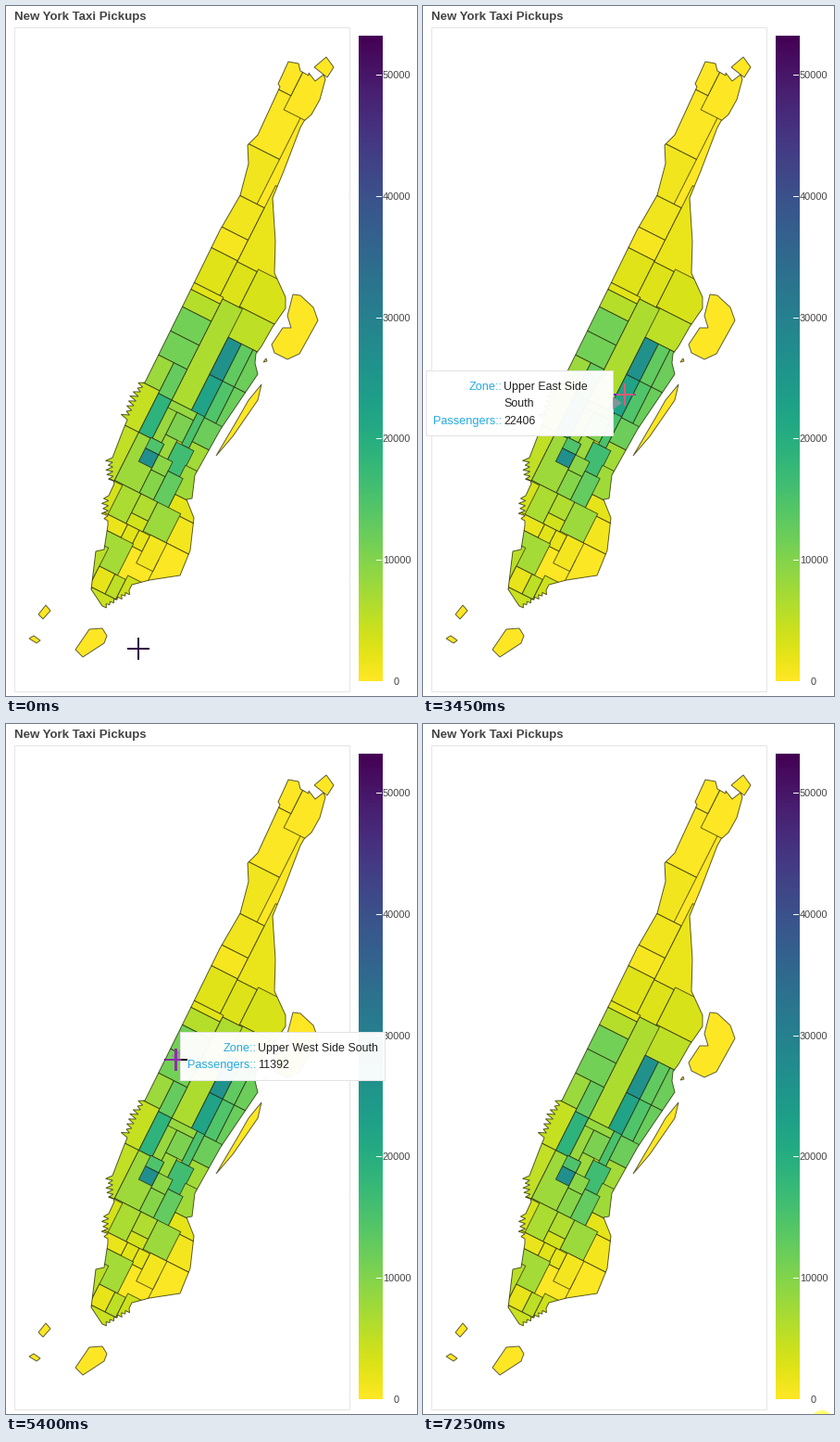
A matplotlib script that plays this animation: 444x744 px, repeating every 7.34 s.

```python
import numpy as np
import matplotlib.pyplot as plt
from matplotlib.animation import FuncAnimation
from matplotlib.collections import PolyCollection
from matplotlib.patches import Circle, Polygon, Rectangle
from matplotlib.path import Path
from matplotlib.textpath import TextPath

W, H = 444, 744
LOOP, STEP = 7340, 20
TOP = 53150
FONT = "Liberation Sans"
TIP_PX = 12.4
EDGE = (0.1, 0.1, 0.05, 0.68)
INK = (0.2, 0.02, 0.27)
CMAP = plt.get_cmap("viridis_r")
rng = np.random.default_rng(4)

fig = plt.figure(figsize=(W / 100, H / 100), dpi=100, facecolor="white")
ax = fig.add_axes([0, 0, 1, 1])
ax.set_xlim(0, W)
ax.set_ylim(H, 0)
ax.axis("off")


def label(x, y, s, px, **kw):
    kw.setdefault("color", "#444444")
    return ax.text(x, y, s, fontsize=px * 0.72, family=FONT, **kw)


def text_width(s):
    path = TextPath((0, 0), s, size=TIP_PX, prop={"family": FONT})
    return path.get_extents().width + 1


def piers(x0, y0, x1, y1, n, depth):
    """Ragged waterfront: n teeth pointing to the outer side of a line."""
    p, q = np.array([x0, y0]), np.array([x1, y1])
    out = np.array([y1 - y0, x0 - x1]) / np.hypot(x1 - x0, y1 - y0)
    pts = []
    for f in np.arange(n) / n:
        foot = p + (q - p) * f
        tip_at = foot + (q - p) * 0.4 / n
        pts += [foot, tip_at + out * depth * rng.uniform(0.5, 1.1)]
    return pts + [q]


# ---- shoreline, clockwise from the north-west corner
SHORE = np.array([
    (296, 87), (294, 84), (300, 71), (305, 60), (316, 62), (318, 70), (327, 75),
    (327, 72), (334, 81), (343, 74), (345, 79), (339, 101), (330, 117),
    (322, 124), (318, 131), (300, 178), (288, 207), (291, 254), (290, 288),
    (302, 314), (302, 326), (288, 346), (276, 367), (270, 375), (269, 385),
    (272, 397), (232, 456), (204, 506), (201, 531), (195, 532), (203, 552),
    (199, 587), (188, 614), (155, 619), (136, 624),
    *piers(133, 630, 104, 647, 7, 4), (92, 629), (97, 588), (106, 586),
    (110, 560), *piers(110, 555, 111, 528, 5, 7), (117, 515),
    *piers(116, 512, 115, 487, 5, 7), (125, 461),
    *piers(131, 446, 150, 406, 8, 8), (203, 299), (231, 242), (253, 204),
    (262, 170), (261, 150), (272, 139)])
shore = Path(SHORE)

# ---- zones lie on the street grid: a runs across town, s runs downtown
ORIGIN = np.array([234, 316])
ACROSS, DOWN = np.array([0.893, 0.451]), np.array([-0.451, 0.893])
zones = []


def column(a0, a1, s, *blocks):
    """Stack blocks of (end, passengers, name) between two avenues."""
    for end, value, name in blocks:
        corners = [(a0, s), (a1, s), (a1, end), (a0, end)]
        pts = np.array([ORIGIN + a * ACROSS + b * DOWN for a, b in corners])
        zones.append((value, name, pts, Path(pts), CMAP(value / TOP)))
        s = end


# uptown
column(-16, 20, -222, (-108, 40, "Highbridge Park"))
column(-70, -13, -229, (-162, 400, "Washington Heights North"),
       (-108, 1107, "Washington Heights South"))
column(-33, 40, -300, (-212, 150, "Inwood"))
column(-70, -33, -300, (-229, 90, "Inwood Hill Park"))
column(-50, -4, -108, (-69, 1180, "Hamilton Heights"),
       (-44, 700, "Manhattanville"), (-2, 2690, "Morningside Heights"))
column(-4, 60, -135, (-43, 1724, "Central Harlem North"))
column(-4, 20, -43, (0, 2760, "Central Harlem"))
column(20, 80, -46, (-1, 3180, "East Harlem North"),
       (34, 5240, "East Harlem South"))

# around the park
column(-50, 0, -2, (6, 2300, "Manhattan Valley"), (27, 5870, "Bloomingdale"),
       (56, 11411, "Upper West Side North"), (85, 11392, "Upper West Side South"))
column(0, 24, 0, (122, 6540, "Central Park"))
column(24, 40, 34, (79, 26380, "Upper East Side North"),
       (123, 22406, "Upper East Side South"))
column(40, 54, 34, (79, 12900, "Yorkville West"), (123, 14700, "Lenox Hill West"))
column(54, 80, 34, (79, 11900, "Yorkville East"), (125, 12100, "Lenox Hill East"))
column(-60, -16, 85, (119, 7930, "Lincoln Square West"),
       (169, 4600, "Clinton West"), (228, 5010, "West Chelsea/Hudson Yards"))
column(-16, 0, 85, (122, 12600, "Lincoln Square East"),
       (169, 18700, "Clinton East"))

# midtown
column(0, 11, 123, (168, 8300, "Theatre District"))
column(0, 31, 122, (131, 8400, "Midtown North"))
column(11, 31, 131, (158, 10500, "Midtown Center"))
column(31, 40, 122, (160, 15200, "Midtown East"))
column(40, 80, 123, (152, 12000, "Sutton Place"), (180, 7400, "Turtle Bay"))
column(11, 25, 158, (182, 8000, "Midtown South"))
column(25, 46, 160, (192, 16400, "Murray Hill"))
column(45, 80, 178, (211, 7600, "Kips Bay"))
column(-16, 14, 169, (227, 7700, "East Chelsea"))
column(-2, 14, 168, (181, 14800, "Garment District"), (197, 26900, "Penn Plaza"))
column(14, 31, 181, (199, 9200, "Flatiron"), (227, 9568, "Union Sq"))

# downtown
column(49, 110, 211, (230, 2100, "Alphabet City"), (262, 900, "Lower East Side"),
       (330, 300, "Lower East Side"))
column(31, 49, 192, (228, 12700, "Gramercy"))
column(36, 64, 227, (262, 8060, "East Village"))
column(-16, 16, 227, (263, 6700, "West Village"))
column(-60, -6, 228, (264, 3500, "Meatpacking"))
column(16, 36, 227, (250, 6400, "Greenwich Village North"),
       (263, 3600, "Greenwich Village South"))
column(-30, 18, 263, (279, 1700, "Hudson Sq"))
column(18, 32, 263, (281, 2300, "SoHo"))
column(32, 45, 263, (282, 1900, "Little Italy"))
column(32, 65, 282, (335, 250, "Two Bridges"))
column(45, 65, 262, (296, 1000, "Chinatown"))
column(-20, 33, 279, (317, 7100, "TriBeCa"))
column(-40, 11, 295, (360, 5600, "Battery Park"))
column(11, 30, 317, (341, 1900, "World Trade"))
column(30, 43, 317, (341, 5200, "Financial North"))
column(43, 60, 312, (341, 4000, "Seaport"))
column(14, 60, 341, (375, 4300, "Financial South"))

ax.add_patch(Polygon(SHORE, fc=CMAP(0.05), lw=0))
blocks = ax.add_collection(PolyCollection(
    [z[2] for z in zones], facecolors=[z[4] for z in zones],
    edgecolors=EDGE, linewidths=0.68))
blocks.set_clip_path(shore, transform=ax.transData)
ax.add_patch(Polygon(SHORE, fill=False, ec=EDGE, lw=0.72))


def island(*pts):
    ax.add_patch(Polygon(pts, fc=CMAP(0), ec=EDGE, lw=0.72))


island((333, 66), (346, 55), (354, 66), (347, 77))
island((310, 311), (318, 312), (332, 325), (337, 339), (317, 375), (304, 381),
       (290, 374), (287, 365), (299, 347), (308, 347), (304, 334))
island((276, 408), (272, 425), (245, 464), (227, 485), (250, 446), (262, 425))
island((90, 672), (104, 671), (109, 679), (106, 687), (83, 702), (75, 694))
island((35, 656), (43, 646), (48, 652), (40, 661))
island((25, 682), (30, 679), (37, 684), (33, 687))
island((278, 384), (281, 380), (282, 383))

# ---- title, plot frame and colour bar
label(9, 15, "New York Taxi Pickups", 13.3, weight="bold")
ax.add_patch(Rectangle((8.5, 22.5), 362, 716, fill=False, ec="#e5e5e5", lw=0.72))
ax.imshow(np.linspace(1, 0, 256)[:, None], cmap=CMAP, vmin=0, vmax=1,
          extent=(380.5, 405.5, 728, 32.5), aspect="auto")
for v in range(0, TOP, 10000):
    y = 728 - v * 0.01308
    if v:
        ax.plot([400, 405], [y, y], color="white", lw=0.72)
    label(422, y + 4, str(v), 11, ha="center")

# ---- tooltip and pointer
box = ax.add_patch(Rectangle((0, 0), 1, 1, fc=(1, 1, 1, 0.96), ec="#e3e3e3",
                             lw=0.72, zorder=5))
arrow = ax.add_patch(Polygon([(0, 0), (0, 1), (1, 0)], fc="#909599",
                             alpha=0.85, lw=0, zorder=5))
keys = [label(0, 0, s, TIP_PX + 0.3, color="#26aae1", ha="right", zorder=6)
        for s in ("Zone::", "Passengers::")]
vals = [label(0, 0, "", TIP_PX, color="#222222", zorder=6) for _ in range(3)]
tip = [box, arrow, *keys, *vals]

R = 12
offs = np.arange(-R, R) + 0.5
gx, gy = np.meshgrid(offs, offs)
arms = (abs(gx) < 1) | (abs(gy) < 1)
cross = ax.imshow(np.zeros((2 * R, 2 * R, 4)), extent=(0, 1, 1, 0),
                  aspect="auto", interpolation="nearest", zorder=8)
spot = ax.add_patch(Circle((431, 752), 12, fc="#ffff70", lw=0, zorder=9))

# The pointer moves in bursts (start ms, end ms, steps) along a path of
# key points: step count, pointer x, y, hovered x, y.
BURSTS = [(70, 730, 9), (810, 960, 3), (1130, 1580, 7), (2440, 2830, 6),
          (3450, 3780, 5), (4270, 5000, 11), (5150, 5860, 10),
          (5950, 6650, 10), (6730, 6960, 4)]
OFF = (float("nan"),) * 2
PATH = np.array([
    (0, 143, 693, *OFF), (6, 178, 430, *OFF), (7, 186, 375, 191, 360),
    (8, 190, 345, 192, 336), (9, 192, 358, 194, 351), (12, 209, 364, 200, 359),
    (15, 212, 356, 202, 351), (19, 212, 372, 212, 394), (25, 212, 428, 215, 428),
    (26, 218, 419, 215, 428), (30, 236, 389, 236, 389),
    (36, 263, 262, 277, 239.5), (41, 281, 166, 281, 166),
    (45, 183, 362, 178, 358), (51, 112, 462, 122, 487),
    (55, 155, 530, 160, 518), (57, 190, 575, 186, 580), (58, 215, 605, *OFF),
    (61, 308, 717, *OFF), (64, 401, 745, *OFF), (65, 401, 800, *OFF)])
step_times = np.concatenate([np.linspace(*b) for b in BURSTS])


def zone_at(x, y):
    if np.isnan(x) or not shore.contains_point((x, y)):
        return None
    for value, name, _, path, _ in reversed(zones):
        if path.contains_point((x, y)):
            return value, name
    return None


def place_tip(hx, hy):
    """Lay out the tooltip beside the hovered point; return its box."""
    hit = zone_at(hx, hy)
    for artist in tip:
        artist.set_visible(hit is not None)
    if hit is None:
        return None
    value, name = hit
    lines = [name]
    wide = 92 + text_width(name)
    if hx < 190:
        left = edge = hx + 10
        right = left + wide
    else:
        right = edge = hx - 10
        left = right - wide
        if left < 3:
            left = 3
            lines = name.rsplit(" ", 1)
    tall = 34 + 18 * len(lines)
    top = hy - tall / 2
    box.set_bounds(left, top, right - left, tall)
    arrow.set_xy([(edge, hy - 7), (edge, hy + 7), (hx, hy)])
    base = top + 21
    keys[0].set_position((left + 82.5, base))
    keys[1].set_position((left + 82.5, base + 18.3 * len(lines)))
    for j, s in enumerate(lines + [str(value)] + [""] * (2 - len(lines))):
        vals[j].set_text(s)
        vals[j].set_position((left + 84, base + 18.3 * j))
    return left, top, right, top + tall


def place_cross(x, y, tip_box):
    """The pointer inverts whatever lies below it."""
    px, py = gx[arms] + x, gy[arms] + y
    pts = np.column_stack([px, py])
    ink = np.tile(INK, (px.size, 1))
    land = shore.contains_points(pts)
    for _, _, _, path, rgba in zones:
        ink[land & path.contains_points(pts)] = 1 - np.array(rgba[:3])
    if tip_box:
        l, t, r, b = tip_box
        ink[(px > l) & (px < r) & (py > t) & (py < b)] = 0
    img = np.zeros((2 * R, 2 * R, 4))
    img[arms] = np.column_stack([ink, np.ones(px.size)])
    cross.set_data(img)
    cross.set_extent((x - R, x + R, y + R, y - R))


def draw(i):
    t = i * STEP + STEP / 2 + 0.01
    n = np.searchsorted(step_times, t)
    x, y, hx, hy = (np.interp(n, PATH[:, 0], c) for c in PATH[:, 1:].T)
    place_cross(round(x), round(y), place_tip(hx, hy))
    cross.set_visible(t < 6960)
    spot.set_visible(t >= 7250)
    return [*tip, cross, spot]


anim = FuncAnimation(fig, draw, frames=LOOP // STEP, interval=STEP,
                     repeat=True, repeat_delay=0, blit=False)
plt.show()
```
